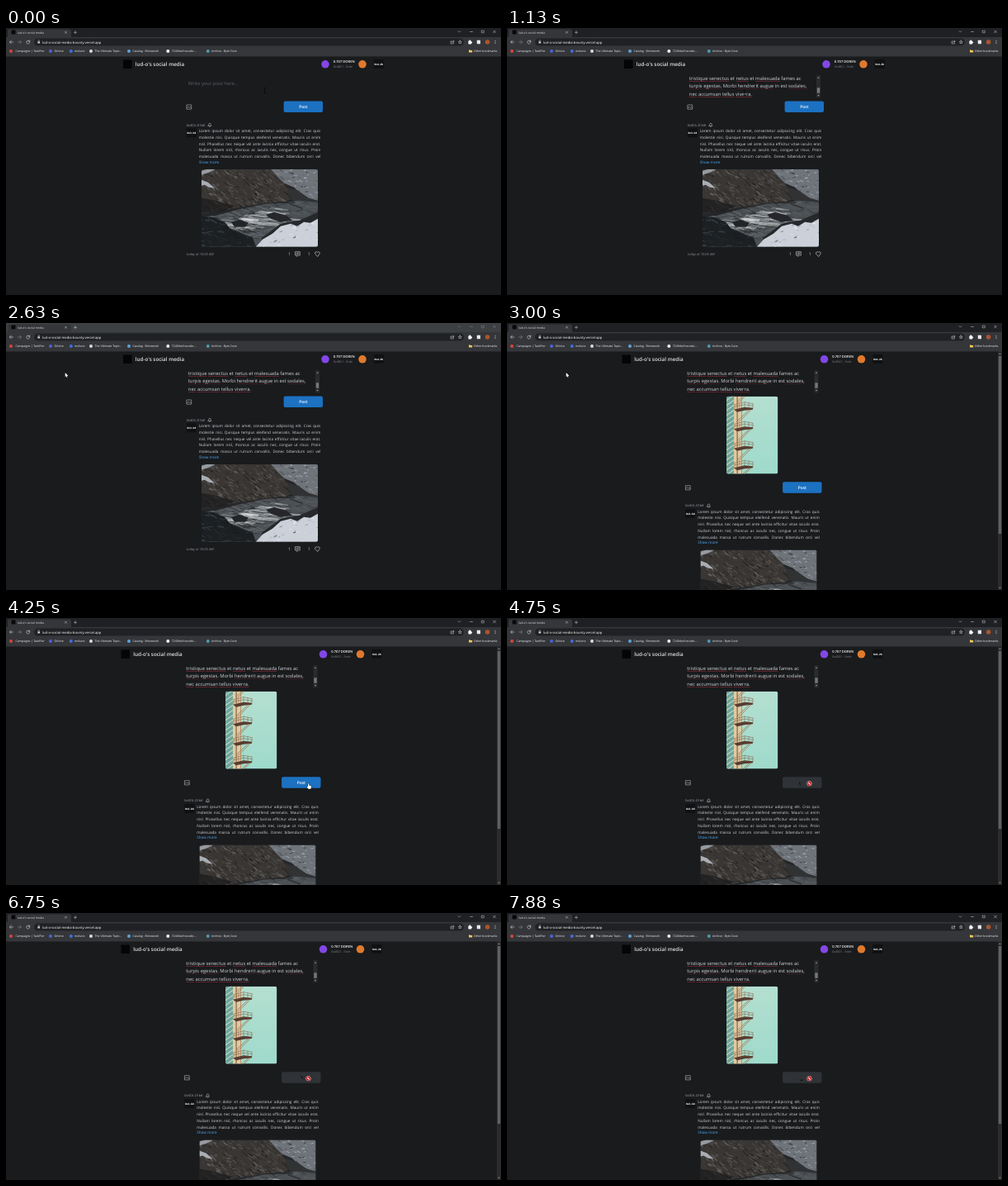
Recreate the animation shown at these times as an HTML page with a canvas. Size 600x323 px, loop 8000 ms.

```html
<!DOCTYPE html>
<html lang="en">
<head>
<meta charset="utf-8">
<title>lud-o's social media</title>
<style>
html, body { margin: 0; width: 100%; height: 100%; overflow: hidden; background: #191b1d; }
canvas { display: block; width: 600px; height: 323px; }
</style>
</head>
<body>
<canvas id="stage"></canvas>
<script>
const W = 600, H = 323, LOOP = 8000, STEP = 125;
const PASTE = 875, BLUR = 1625, ATTACH = 2875, SEND = 4375;
const canvas = document.getElementById('stage');
const dpr = window.devicePixelRatio || 1;
canvas.width = W * dpr;
canvas.height = H * dpr;
const c = canvas.getContext('2d');
c.scale(dpr, dpr);
const FONT = '"Open Sans", "Noto Sans", sans-serif';

function text(s, x, y, size, color, style = '', align = 'left') {
  c.font = `${style} ${size}px ${FONT}`;
  c.textRendering = 'geometricPrecision';
  c.textAlign = align;
  c.fillStyle = color;
  c.fillText(s, x, y);
  return c.measureText(s).width;
}
function rect(x, y, w, h, color, r = 0) {
  c.fillStyle = color;
  c.beginPath();
  c.roundRect(x, y, w, h, r);
  c.fill();
}
function dot(x, y, r, color) {
  c.fillStyle = color;
  c.beginPath();
  c.arc(x, y, r, 0, 7);
  c.fill();
}
function stroke(d, x, y, color, width = .6) {
  c.save();
  c.translate(x, y);
  c.strokeStyle = color;
  c.lineWidth = width;
  c.lineJoin = c.lineCap = 'round';
  c.stroke(new Path2D(d));
  c.restore();
}
function fill(d, x, y, color) {
  c.save();
  c.translate(x, y);
  c.fillStyle = color;
  c.fill(new Path2D(d));
  c.restore();
}
function seeded(n) {
  return () => (n = (n * 16807) % 2147483647) / 2147483647;
}
const mix = (a, b, p) => a + (b - a) * p;

function browser(active) {
  const pale = '#f6f7f8', ink = '#d3d6da';
  const sign = active ? ink : '#85888c';
  rect(0, 0, W, 12, active ? '#1f2023' : '#3c4043');
  rect(2, 1.5, 77, 12, '#35363a', 2.5);
  rect(0, 11, W, 23.5, '#35363a');
  rect(6.5, 2.5, 5, 5, '#08080a');
  text("lud-o's social media", 14, 6.7, 3.5, '#dfe1e5');
  stroke('M-1-1L1 1M1-1L-1 1', 72.5, 5.3, ink, .5);
  stroke('M-1.6 0H1.6M0-1.6V1.6', 84, 5.3, ink, .5);
  stroke('M-1.3-.7L0 .6L1.3-.7', 549.5, 4.5, sign, .5);
  stroke('M-1.5 0H1.5', 564, 4.5, sign, .5);
  stroke('M-1.3-1.3H1.3V1.3H-1.3Z', 578, 4.5, sign, .5);
  stroke('M-1.4-1.4L1.4 1.4M1.4-1.4L-1.4 1.4', 592, 4.5, sign, .5);

  stroke('M2 0H-2M-.2-1.9L-2 0L-.2 1.9', 6.5, 17, ink);
  stroke('M-2 0H2M.2-1.9L2 0L.2 1.9', 16.5, 17, '#85878b');
  stroke('M1.7-1A2 2 0 1 0 2 .5M2-2V-.6H.6', 26.7, 17, ink);
  rect(34, 12.6, 521, 8.9, '#202124', 4.4);
  rect(38.4, 16.4, 2.7, 2.2, ink, .3);
  stroke('M-.8 0V-1A.8.8 0 0 1 .8-1V0', 39.75, 16.4, ink, .45);
  text('lud-o-social-media-bounty.vercel.app', 44, 18.5, 4.15, '#fff', '500');
  stroke('M-.5-1H-2V2H1.5V.6M-.8.5Q-.5-1 2-1M1-2L2-1L1 0', 541, 17, ink, .5);
  stroke('M0-2L.6-.6L2-.5L.9.4L1.3 1.9L0 1.1L-1.3 1.9L-.9.4L-2-.5L-.6-.6Z', 550.3, 17, ink, .5);
  rect(560.4, 15.6, 3.8, 3.8, '#fff', .6);
  dot(562.2, 15.4, .9, '#fff');
  dot(564.4, 17.5, .8, '#fff');
  rect(570.8, 14.8, 4.2, 4.4, '#e9ecf1', .5);
  dot(583.6, 17, 2.8, '#a9552f');
  for (const dy of [-1.6, 0, 1.6]) dot(593, 17 + dy, .5, ink);

  const marks = [
    [6, '#d5473b', 'Campaigns | TaskPier', 11.5],
    [54, '#4c62d9', 'Orbine', 58.5],
    [78.8, '#3d70e0', 'molune', 83],
    [103, '#d8dadd', 'The Ultimate Topic...', 107.5],
    [149, '#5ca5d8', 'Catalog - Brinework', 153.5],
    [196.3, '#eceef0', '7240rkel/vscode-...', 200.7],
    [244.8, '#4c9bb0', 'Archive - Byte Cove', 249]
  ];
  for (const [ix, color, label, x] of marks) {
    dot(ix, 28, 2, color);
    text(label, x, 29.3, 3.48, pale, '500');
  }
  fill('M-2-1.6H-.5L0-1H2.2V1.6H-2Z', 563, 28, '#f0c75b');
  text('Other bookmarks', 567, 29.3, 3.48, pale, '500');
}

function avatar(x, y, label) {
  rect(x, y, 12, 11, '#101113', 1);
  text(label, x + 6, y + 6.8, 3.1, '#fff', 'bold', 'center');
}

function header(dx) {
  rect(142 + dx, 38.5, 10.5, 10.5, '#050506');
  text("lud-o's social media", 156.8 + dx, 46.2, 6.3, '#e0e2e4', '600');
  dot(387 + dx, 43.8, 4.8, '#8247e5');
  text('0.707 DOREN', 396.8 + dx, 42.3, 4.1, '#f6f7f8', '600');
  text('0x4B21...9cde', 396.8 + dx, 48.4, 3.6, '#80848b');
  dot(432 + dx, 43.8, 4.8, '#e0792d');
  avatar(445.8 + dx, 38, '0x4..2b');
}

// A leading ~ marks a word with a spelling underline.
const DRAFT = [
  '~tristique ~senectus et ~netus et ~malesuada fames ac',
  '~turpis ~egestas. Morbi ~hendrerit ~augue in est ~sodales,',
  '~nec ~accumsan ~tellus ~viverra.'
];

function draft(dx) {
  c.save();
  c.beginPath();
  c.rect(215, 56.3, 172, 28);
  c.clip();
  DRAFT.forEach((line, i) => {
    const y = 62.6 + i * 9.69;
    let x = 220.8 + dx;
    for (const word of line.split(' ')) {
      const bad = word[0] === '~';
      const w = text(bad ? word.slice(1) : word, x, y, 5.83, '#d2d4d7');
      if (bad) rect(x, y + 1.35, w, .45, '#a62f3a');
      x += w + c.measureText(' ').width;
    }
  });
  c.restore();
  const x = 375 + dx;
  rect(x, 57.3, 5, 27, '#2b2b2d');
  rect(x + .8, 72.3, 3.4, 6.4, '#77787a');
  fill('M-1.2.7H1.2L0-.8Z', x + 2.5, 60, '#a5a5a7');
  fill('M-1.2-.7H1.2L0 .8Z', x + 2.5, 81.6, '#a5a5a7');
}

function photo(x, y, w, h, paint) {
  c.save();
  c.translate(x, y);
  c.beginPath();
  c.roundRect(0, 0, w, h, 2.5);
  c.clip();
  paint(w, h);
  c.restore();
}

// Scatters n short strokes of one tint over a clipped outline.
function grain(outline, n, seed, [lo, hi], [r, g, b], slope, len) {
  const rnd = seeded(seed);
  c.save();
  c.clip(new Path2D(outline));
  for (let i = 0; i < n; i++) {
    const x = rnd() * 145 - 4, y = rnd() * 96, v = mix(lo, hi, rnd()), l = len * (.4 + rnd());
    c.strokeStyle = `rgba(${v * r},${v * g},${v * b},.75)`;
    c.lineWidth = .4 + rnd() * 1.1;
    c.beginPath();
    c.moveTo(x, y);
    c.lineTo(x + l, y + l * (slope + rnd() - .5));
    c.stroke();
  }
  c.restore();
}

function river(w, h) {
  const cliff = 'M0 0H91L101 20L116 33L102 39L78 41L48 46L0 54Z';
  const bank = 'M84 0H141V39L124 33L112 22L100 17L92 9Z';
  const stream = 'M141 40L116 38L100 41L78 42L48 48L18 56L0 58V94H141Z';
  const rocks = 'M0 57L14 58L28 64L34 71L49 78L62 83L66 94H0Z';
  const snow = 'M66 94L74 85L86 78L96 69L108 66L116 69L124 64L132 65L141 60V94Z';

  rect(0, 0, w, h, '#242628');
  fill(cliff, 0, 0, '#393634');
  grain(cliff, 1100, 91, [22, 112], [1.04, 1, .95], .75, 5);
  fill('M0 35L18 38L41 45L25 51L0 53Z', 0, 0, 'rgba(20,21,23,.6)');
  fill('M0 13L8 16L16 23L9 22L4 19L0 20Z', 0, 0, '#a9adb4');
  fill('M0 2L7 0H17L9 4L0 7Z', 0, 0, '#969aa1');

  fill(bank, 0, 0, '#6f747b');
  grain(bank, 700, 37, [35, 235], [.97, 1, 1.04], .2, 3);
  fill('M102 22L117 26L130 35L141 38V46L120 42L109 37Z', 0, 0, '#303234');

  fill(stream, 0, 0, '#4c5155');
  grain(stream, 600, 58, [28, 125], [.95, 1, 1.04], .15, 12);
  // bands of white water
  const rnd = seeded(14);
  for (let i = 0; i < 60; i++) {
    const p = rnd(), x = 22 + p * 72, y = 62 - p * 17 + rnd() * 17, len = 8 + rnd() * 19;
    const v = 165 + rnd() * 65;
    stroke(`M0 0C${len * .3}-3 ${len * .6} 2 ${len} 1`, x, y, `rgba(${v},${v + 4},${v + 7},.5)`, .5 + rnd() * 1.7);
  }
  fill('M78 55L88 52L103 56L110 62L96 64L84 60Z', 0, 0, '#25272a');
  fill('M36 64L46 61L57 65L53 70L40 70Z', 0, 0, '#222426');
  fill(rocks, 0, 0, '#1c2023');
  grain(rocks, 500, 23, [14, 90], [.9, 1, 1.08], .3, 6);

  fill('M73 83L96 66L119 62L141 52V64L96 79L72 94Z', 0, 0, '#26282b');
  fill(snow, 0, 0, '#cbd0d9');
  grain(snow, 320, 71, [130, 255], [.97, 1, 1.05], -.2, 3);
  grain(snow, 70, 42, [35, 100], [1, 1, 1], -.4, 3);
}

function stairs(w, h) {
  const sky = c.createLinearGradient(0, 0, 0, h);
  sky.addColorStop(0, '#b4dfd0');
  sky.addColorStop(1, '#9edacb');
  rect(0, 0, w, h, sky);
  rect(0, 0, 10, h, '#6aa89f');
  for (let y = -8; y < h; y += 6) stroke('M0 7L10 0', 0, y, '#c9d0b7', 1.1);
  rect(9, 0, 10, h, '#dccba4');
  rect(12.5, 0, 1.2, h, '#8d6549');
  rect(18, 0, .8, h, '#ac8862');
  for (let i = -1; i < 4; i++) {
    const y = 14 + i * 23.5;
    stroke('M29 1L13 16M31 1L15 17', 0, y, '#8d6549', .7);
    stroke('M30 1L14 16.5', 0, y, '#d8c6a0', .6);
    fill('M9 2L22-1L32 0V2L22 3L13 5Z', 0, y, '#593c30');
    stroke('M10-4L22-7L32-5M10-1.5L22-4L32-2.5', 0, y, '#80563f', .5);
    stroke('M10-4V2M16-5.5V1M22-7V0M27-6V0M32-5V1', 0, y, '#80563f', .5);
  }
}

const POST = [
  'Lorem ipsum dolor sit amet, consectetur adipiscing elit. Cras quis',
  'molestie nisi. Quisque tempus eleifend venenatis. Mauris ut enim',
  'nisl. Phasellus nec neque vel ante lacinia efficitur vitae iaculis erat.',
  'Nullam lorem nisl, rhoncus ac iaculis nec, congue ut risus. Proin',
  'malesuada massa ut rutrum convallis. Donec bibendum orci vel'
];

function justify(line, x, y, width, size, color) {
  const words = line.split(' ');
  c.font = `${size}px ${FONT}`;
  c.textRendering = 'geometricPrecision';
  const used = words.reduce((sum, s) => sum + c.measureText(s).width, 0);
  const gap = (width - used) / (words.length - 1);
  for (const s of words) x += text(s, x, y, size, color) + gap;
}

function controls(dx, dy, t) {
  c.save();
  c.translate(dx, dy);
  stroke('M-2.7-2.6H2.7V2.6H-2.7ZM-2.6 1L-1-.4L.4.8L1.3 0L2.6 1.1', 222, 95.6, '#b4b6ba', .6);
  const busy = t >= SEND;
  rect(336.6, 88.6, 47.4, 13.5, busy ? '#2f3236' : '#1c71c1', 2);
  if (busy) {
    const a = Math.PI * (.75 + 2 * (t - 5500) / 826);
    c.strokeStyle = '#0b0c0d';
    c.lineWidth = 1;
    c.beginPath();
    c.arc(359.7, 96.4, 2.5, a - .85, a + .85);
    c.stroke();
  } else {
    text('Post', 360.3, 97.2, 4.9, '#fff', '600', 'center');
  }
  c.restore();
}

function post(dx, dy) {
  const pale = '#d2d4d7';
  c.save();
  c.translate(dx, dy);
  text('0x3C6..D1b8', 218.8, 118.7, 3.75, '#b0b3b8');
  stroke('M-2 1.2H2Q1.3.6 1.3-.6A1.3 1.3 0 0 0-1.3-.6Q-1.3.6-2 1.2M-.5 2H.5', 247, 117.2, pale, .5);
  avatar(218.8, 121.2, '0x3..b8');
  POST.forEach((line, i) => justify(line, 233.7, 126 + i * 7.75, 147.6, 4.65, pale));
  text('Show more', 233.7, 163.7, 4.65, '#4dabf7');
  photo(237, 170.8, 141, 94, river);
  text('today at 10:05 AM', 218.8, 275, 4.1, '#8b8f96', 'italic');
  text('1', 342.3, 275.2, 4.9, pale);
  stroke('M-2.7-2.6H2.7V1.7H.8L-1 3V1.7H-2.7ZM-1.4-1.1H1.4M-1.4.3H.8', 353.6, 273.3, pale, .6);
  text('1', 365.8, 275.2, 4.9, pale);
  stroke('M0 2.8L-2.6 0A1.6 1.6 0 0 1 0-1.9A1.6 1.6 0 0 1 2.6 0Z', 377.4, 273.4, pale, .65);
  c.restore();
}

function scrollbar() {
  rect(595, 34.5, 5, H - 34.5, '#2b2b2d');
  rect(595.8, 40, 3.4, 215, '#606163');
  fill('M-1.2.7H1.2L0-.8Z', 597.5, 37.4, '#a5a5a7');
  fill('M-1.2-.7H1.2L0 .8Z', 597.5, 320.4, '#a5a5a7');
}

// time, x, y, shape
const PATH = [
  [0, 313.5, 75.5, 'beam'],
  [1000, 313.5, 75.5, 'beam'],
  [1250, 262, 82, 'arrow'],
  [1375, 223, 95, 'hand'],
  [BLUR, 223, 95, 'arrow'],
  [1750, 230.7, 98.4, 'arrow'],
  [2000, 222, 95, 'arrow'],
  [2625, 71.7, 60, 'arrow'],
  [3375, 71.7, 60, 'arrow'],
  [4000, 367, 200.8, 'hand'],
  [SEND, 366.5, 200.3, 'barred'],
  [LOOP, 366.5, 200.3, 'barred']
];

function pointer(t) {
  const i = PATH.findIndex((p, n) => t < PATH[n + 1][0]);
  const [t0, x0, y0, shape] = PATH[i], [t1, x1, y1] = PATH[i + 1];
  const p = (t - t0) / (t1 - t0), q = p * p * (3 - 2 * p);
  const x = mix(x0, x1, q), y = mix(y0, y1, q);
  if (shape === 'beam') {
    stroke('M-.9-3H.9M0-3V3M-.9 3H.9', x, y, '#050506', .6);
  } else if (shape === 'arrow') {
    const d = 'M0 0V5.3L1.2 4.2L2 6L2.9 5.6L2.1 3.9H3.8Z';
    stroke(d, x, y, '#000', .6);
    fill(d, x, y, '#fff');
  } else if (shape === 'hand') {
    const d = 'M-.6 0Q0-.6.6 0V2L3 2.6Q3.6 2.8 3.4 4L2.8 6.3H-.4L-2 3.8Q-1.6 3-.6 3.8Z';
    stroke(d, x, y, '#000', .6);
    fill(d, x, y, '#fff');
  } else {
    dot(x, y, 3, '#f4e9e9');
    dot(x, y, 2.7, '#c8232c');
    stroke('M-.9-.9L.9.9', x, y, '#fff', 1.1);
  }
}

function draw(t) {
  const attached = t >= ATTACH;
  const dx = attached ? -2.5 : 0, dy = attached ? 103.7 : 0;
  rect(0, 0, W, H, '#191b1d');
  header(dx);
  if (t < PASTE) text('Write your post here...', 220.8, 68.5, 5.85, '#5c5f66');
  else draft(dx);
  if (attached) photo(266, 88.7, 62.4, 93.8, stairs);
  controls(dx, dy, t);
  post(dx, dy);
  if (attached) scrollbar();
  // the file dialog holds the focus until the picture is attached
  browser(t < BLUR || attached);
  pointer(t);
}

const start = performance.now();
let shown = -1;
function tick() {
  const t = (performance.now() - start) % LOOP;
  const step = Math.floor(t / STEP);
  if (step !== shown) draw((shown = step) * STEP);
  requestAnimationFrame(tick);
}
tick();
</script>
</body>
</html>
```
